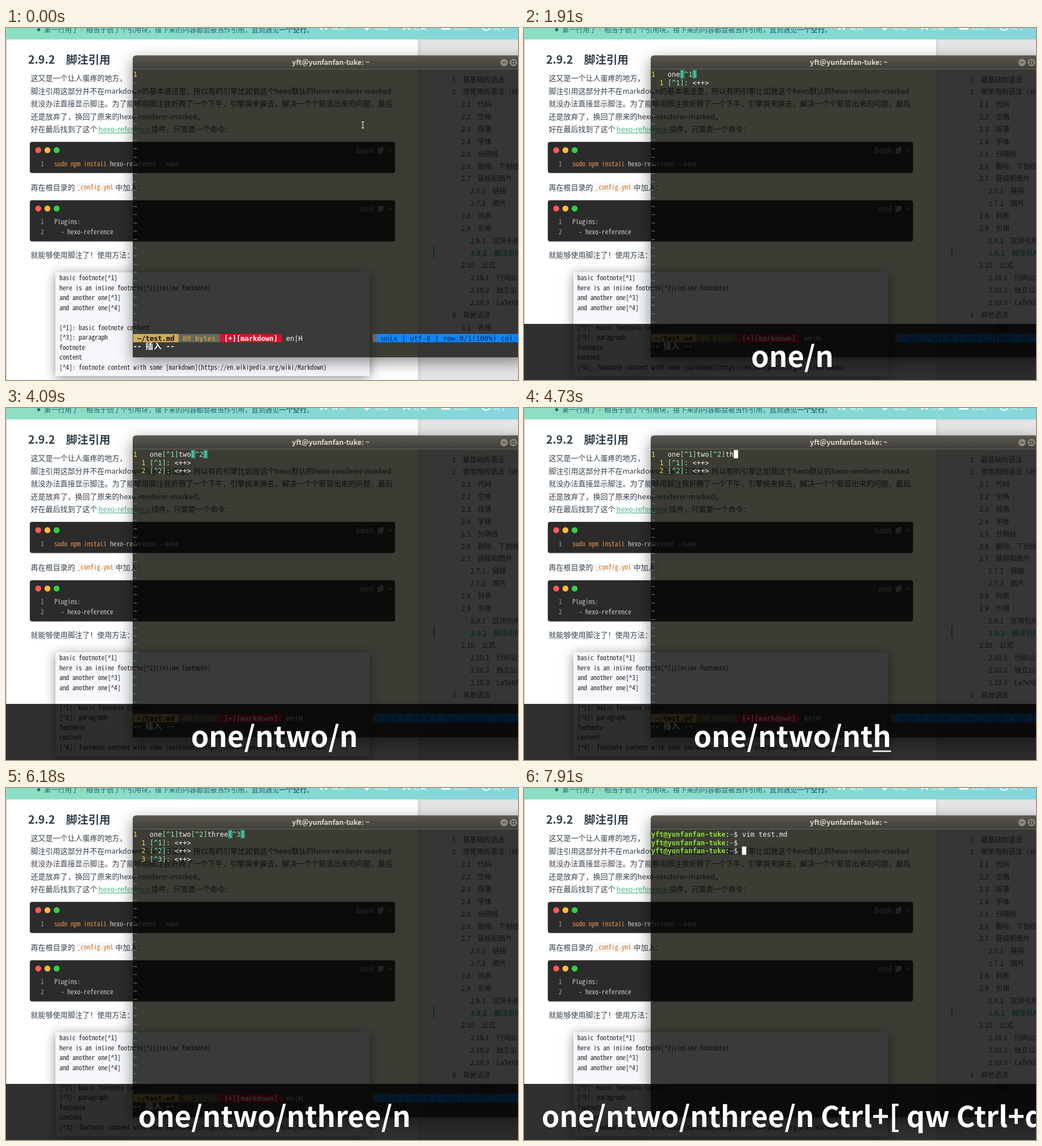
An HTML page with a canvas that plays this animation: 901x621 px, repeating every 8000 ms.

```html
<!DOCTYPE html>
<html lang="zh">
<head>
<meta charset="utf-8">
<style>
html, body { margin: 0; width: 100%; height: 100%; overflow: hidden; }
canvas { display: block; }
</style>
</head>
<body>
<canvas id="stage" width="901" height="621"></canvas>
<script>
const ctx = document.getElementById('stage').getContext('2d');
const W = 901, H = 621, LOOP = 8000;
const SANS = '"Noto Sans CJK SC", "Noto Sans", sans-serif';
const CODE = '"Noto Sans Mono CJK SC", "Noto Sans Mono", monospace';
const TERM = '"DejaVu Sans Mono", "Noto Sans Mono CJK SC", monospace';
const WIN = { x: 223, y: 48.5, w: 690, h: 532.5, bar: 24 };
const CELL = { x: 223.7, y: 74.2, w: 7.27, h: 14.55 };
const USER = 'yft@yunfanfan-tuke';

// ---------- drawing helpers ----------
function text(str, x, y, color, font, align = 'left') {
  ctx.font = font;
  ctx.fillStyle = color;
  ctx.textAlign = align;
  ctx.fillText(str, x, y);
  return x + ctx.measureText(str).width;
}
function rect(x, y, w, h, color, radius = 0) {
  ctx.fillStyle = color;
  ctx.beginPath();
  ctx.roundRect(x, y, w, h, radius);
  ctx.fill();
}
function circle(x, y, r, color) {
  ctx.fillStyle = color;
  ctx.beginPath();
  ctx.arc(x, y, r, 0, 7);
  ctx.fill();
}
function line(points, color, width) {
  ctx.strokeStyle = color;
  ctx.lineWidth = width;
  ctx.beginPath();
  points.forEach(([x, y]) => ctx.lineTo(x, y));
  ctx.stroke();
}
function polygon(points, color) {
  ctx.fillStyle = color;
  ctx.beginPath();
  points.forEach(([x, y]) => ctx.lineTo(x, y));
  ctx.fill();
}
function gradient(x0, y0, x1, y1, ...colors) {
  const g = ctx.createLinearGradient(x0, y0, x1, y1);
  colors.forEach((c, i) => g.addColorStop(i / (colors.length - 1), c));
  return g;
}
function shadowed(color, blur, dy, draw) {
  ctx.save();
  ctx.shadowColor = color;
  ctx.shadowBlur = blur;
  ctx.shadowOffsetY = dy;
  draw();
  ctx.restore();
}

// ---------- web page behind the terminal ----------
const CONTENTS = [
  '1 最基础的语法', '2 很常用的语法（对新手）', '2.1 代码', '2.2 空格', '2.3 段落', '2.4 字体',
  '2.5 分隔线', '2.6 删除、下划线', '2.7 链接和图片', '2.7.1 链接', '2.7.2 图片', '2.8 列表',
  '2.9 引用', '2.9.1 区块引用', '2.9.2 脚注引用', '2.10 公式', '2.10.1 行间公式',
  '2.10.2 独立公式', '2.10.3 LaTeX的公式', '3 其他语法', '3.1 表格'];
const FOOTNOTES = [
  'basic footnote[^1]', 'here is an inline footnote[^2](inline footnote)', 'and another one[^3]',
  'and another one[^4]', '', '[^1]: basic footnote content', '[^3]: paragraph', 'footnote', 'content',
  '[^4]: footnote content with some [markdown](https://en.wikipedia.org/wiki/Markdown)'];

function header() {
  rect(0, 0, W, 20, gradient(0, 0, W, 0, '#8cdfc2', '#86d9cf', '#88d6dd'));
  rect(0, 20, W, 3, gradient(0, 20, 0, 23, 'rgba(0,0,0,.05)', 'rgba(0,0,0,0)'));
  const font = `12.14px ${SANS}`, ink = '#2d6470', white = '#f4fffd';
  circle(57.5, 3, 2.8, ink);
  text('第一行用了', 67, 8, ink, font);
  text('>', 131, 7, '#b08a40', `10.5px ${CODE}`);
  let x = text('相当于创了个引用块，接下来的内容都会被当作引用，直到遇见', 141, 8, ink, font);
  x = text('一个空行', x, 8, ink, 'bold ' + font);
  text('。', x, 8, ink, font);

  ['首页', '标签', '分类', '归档', '关于'].forEach((label, i) =>
    text(label, [573, 649, 716, 787, 857][i], 3, white, font));
  rect(553, -4, 4, 7, white);
  rect(561, -4, 4, 7, white);
  polygon([[627, -3], [635, 5], [642, -2]], white);
  polygon([[699, -4], [699, 4], [705, 0], [711, 4], [711, -4]], white);
  rect(766, -6, 16, 9, white, 1);
  ctx.strokeStyle = white;
  ctx.lineWidth = 2;
  ctx.beginPath();
  ctx.arc(845, -3, 7, 0, 7);
  ctx.stroke();
}

function codeBlock(y, h, label) {
  shadowed('rgba(0,0,0,.2)', 3, 0, () => rect(42, y, 642.5, h, '#2c2b2b', 4));
  ['#fc5a56', '#fdbc40', '#34cf48'].forEach((c, i) => circle(56.7 + 16.2 * i, y + 14.5, 5.2, c));
  const grey = '#888';
  text(label, 647, y + 20, grey, `bold 13px ${SANS}`, 'right');
  rect(654, y + 11, 7, 10, grey, 1);
  rect(658, y + 9, 6, 9, '#999', 1);
  line([[672, y + 17], [675.5, y + 13.5], [679, y + 17]], grey, 1.5);
}

function page() {
  const font = `13px ${SANS}`, ink = '#34404c', code = `11.52px ${CODE}`;
  rect(0, 0, W, H, '#fff');
  rect(WIN.x, WIN.y, 725 - WIN.x, WIN.h, '#fffbe2');
  rect(725, 0, 176, H, '#e5e5e5');
  rect(725, 0, 8, H, gradient(725, 0, 733, 0, 'rgba(0,0,0,.06)', 'rgba(0,0,0,0)'));
  rect(0, 20, 1.5, H, '#d2d4d4');
  header();

  text('2.9.2\u3000脚注引用', 39, 62.5, '#2f3d49', `bold 19.5px ${SANS}`);
  ['这又是一个让人蛋疼的地方，',
   '脚注引用这部分并不在markdown的基本语法里，所以有的引擎比如我这个hexo默认的hexo-renderer-marked',
   '就没办法直接显示脚注。为了能够用脚注我折腾了一个下午，引擎换来换去，解决一个个新冒出来的问题，最后',
   '还是放弃了，换回了原来的hexo-renderer-marked。',
   '好在最后找到了这个'].forEach((s, i) => text(s, 43.5, 93.3 + 22.4 * i, ink, font));
  const linkEnd = text('hexo-reference', 162.5, 183, '#4fb98a', `500 13px ${SANS}`);
  rect(162.5, 184.5, linkEnd - 162.5, 1.2, '#4fb98a');
  text('插件，只需要一个命令：', 255.5, 183, ink, font);

  codeBlock(201, 54.7, 'bash');
  text('1', 61, 244, '#999', code);
  const x = text('sudo npm install', 85, 244, '#e8924f', code);
  text(' hexo-reference --save', x, 244, '#ccc', code);

  text('再在根目录的', 43.5, 285.5, ink, font);
  rect(122, 273, 70, 17, '#f8f8f8', 2);
  text('_config.yml', 125.5, 285, '#d0701c', code);
  text('中加入：', 192.5, 285.5, ink, font);

  codeBlock(304, 72.5, 'xml');
  ['Plugins:', '  - hexo-reference'].forEach((s, i) => {
    text(i + 1, 61, 346 + 18 * i, '#999', code);
    text(s, 85, 346 + 18 * i, '#ccc', code);
  });
  text('就能够使用脚注了！使用方法：', 43.5, 405, ink, font);

  shadowed('rgba(0,0,0,.45)', 18, 3, () => rect(87, 431, 553, 183, '#f5f7fa'));
  FOOTNOTES.forEach((s, i) => text(s, 94, 445 + 17.5 * i, '#1e1e1e', `11.33px ${CODE}`));

  CONTENTS.forEach((entry, i) => {
    const [number, title] = entry.split(' ');
    const active = number === '2.9.2';
    text(number + '\u3000' + title, 769 + 16 * number.split('.').length, 95.6 + 21.85 * i,
      active ? '#30b478' : '#444', `${active ? 'bold ' : ''}12.17px ${SANS}`);
  });
  rect(752, 385, 2, 20, '#30b478');
}

// ---------- terminal window ----------
function terminalWindow() {
  ctx.save();
  ctx.beginPath();
  ctx.rect(0, 0, W, H);
  ctx.roundRect(WIN.x, WIN.y, WIN.w, WIN.h, [6, 6, 0, 0]);
  ctx.clip('evenodd');
  shadowed('rgba(0,0,0,.45)', 26, 8, () => rect(WIN.x, WIN.y, WIN.w, WIN.h, '#000', [6, 6, 0, 0]));
  ctx.restore();

  rect(WIN.x, WIN.y + WIN.bar, WIN.w, WIN.h - WIN.bar, 'rgba(2,2,1,.77)');
  rect(WIN.x, WIN.y, WIN.w, WIN.bar,
    gradient(0, WIN.y, 0, WIN.y + WIN.bar, '#5a5850', '#403f3a'), [6, 6, 0, 0]);
  text(USER + ': ~', 571.5, 65, '#dfdbd2', `bold 12.3px ${SANS}`, 'center');
  circle(876.5, 61, 6.5, '#8c8980');
  circle(893, 61, 6.5, '#8c8980');
  line([[873.5, 61], [879.5, 61]], '#3c3b37', 1.4);
  ctx.strokeRect(890.5, 58.5, 5, 5);
}

// Writes on the character grid and returns the next free column.
function put(row, col, str, color, { bold = false, bg } = {}) {
  const y = CELL.y + CELL.h * row;
  for (const ch of String(str)) {
    const span = ch > '\u2e80' ? 2 : 1;
    const x = CELL.x + CELL.w * col;
    if (bg) rect(x, y, CELL.w * span + .3, CELL.h, bg);
    const font = span === 2 ? `13.5px ${SANS}` : `12.08px ${TERM}`;
    if (ch !== ' ') text(ch, x, y + 11.8, color, (bold ? 'bold ' : '') + font);
    col += span;
  }
  return col;
}
const cursor = (row, col) => put(row, col, ' ', '#fff', { bg: '#fff' });

function statusBar({ mode, buffer, notes }) {
  const row = 32, total = notes + 1;
  let col = put(row, 0, ' ~/test.md ', '#111', { bold: true, bg: '#d0ac5c' });
  col = put(row, col, ' 80 bytes ', '#e0b020', { bg: '#666' });
  col = put(row, col, ' [+][markdown] ', '#fff', { bold: true, bg: '#d4122a' });
  put(row, col, ' en|H', '#fff');
  const percent = Math.floor(100 / total);
  const column = buffer ? buffer.length + (mode === 'insert') : 0;
  const info = ` unix | utf-8 | row:${buffer ? 1 : 0}/${total}(${percent}%) col:${column} `;
  const start = 95 - info.length;
  const syntax = mode === 'syntax' || mode === 'written' ? ' markdownFootnote' : ' ';
  put(row, start - syntax.length, syntax, '#d8b428', { bg: '#666' });
  put(row, start, info, '#06203c', { bg: '#0f87ff' });
}

function editor(state, cursorOn) {
  const { mode, buffer, notes } = state;
  const yellow = '#e8dc50', green = '#87f0af';
  put(0, 0, 1, yellow);
  buffer.split(/(\[\^\d\])/).reduce(
    (col, part) => put(0, col, part, part[0] === '[' ? green : '#f0f0f0'), 4);
  for (let i = 1; i <= notes; i++) {
    put(i, 2, i, yellow);
    put(i, 4, `[^${i}]:`, green);
    put(i, 10, '<++>', '#f0f0f0');
  }
  for (let row = notes + 1; row < 32; row++) put(row, 0, '~', '#5484c0');

  const end = 4 + buffer.length;
  if (buffer.endsWith(']') && mode !== 'written') {
    put(0, end - 4, '[', green, { bg: '#2f9a88' });
    put(0, end - 1, ']', green, { bg: '#2f9a88' });
  }
  if (mode === 'insert') {
    if (cursorOn) cursor(0, end);
    put(33, 0, '-- 插入 --', '#fff', { bold: true });
  } else if (mode === 'written') {
    put(33, 0, '"test.md" 4L, 58C 已写入', '#f0f0f0');
  } else if (cursorOn) {
    put(0, end - 1, ']', '#20604a', { bg: '#8ff5b8' });
  }
  statusBar(state);
}

function shell(prompts, cursorOn) {
  let col;
  for (let row = 0; row < prompts; row++) {
    col = put(row, 0, USER, '#8ae234', { bold: true });
    col = put(row, col, ':', '#f0f0f0');
    col = put(row, col, '~', '#729fcf', { bold: true });
    col = put(row, col, row ? '$ ' : '$ vim test.md', '#f0f0f0');
  }
  if (cursorOn) cursor(prompts - 1, col);
}

// ---------- pressed keys shown along the bottom ----------
const KEYS = 'one/ntwo/nthree/n Ctrl+[ qw Ctrl+d';

function keyOverlay(count, underlined) {
  if (!count) return;
  rect(0, 522, W, 99, 'rgba(0,0,0,.81)');
  const center = 472.3, keys = KEYS.slice(0, count);
  text(keys, center, 597.5, '#fff', `bold 50.6px ${SANS}`, 'center');
  if (!underlined) return;
  const last = keys.match(/(Ctrl\+.|.)$/)[0];
  const right = center + ctx.measureText(keys).width / 2;
  const width = ctx.measureText(last).width;
  rect(right - width, 604.2, width, 2.6, '#fff');
}

// ---------- timeline: time, keys shown, underline, buffer, notes (or prompts), mode ----------
const A = 'one[^1]', B = A + 'two[^2]', C = B + 'three[^3]';
const STEPS = [
  [-600, 0, 0, '', 0],
  [450, 1, 1, 'o', 0], [640, 2, 1, 'o', 0], [730, 2, 1, 'on', 0], [820, 3, 1, 'one', 0],
  [1000, 4, 1, 'one', 0], [1090, 4, 1, 'one/', 0], [1180, 5, 1, 'one/', 0],
  [1360, 5, 0, 'one/', 0], [1450, 5, 0, A, 1],
  [2450, 6, 1, A + 't', 1], [2640, 6, 0, A + 't', 1], [2910, 7, 1, A + 't', 1],
  [3000, 7, 1, A + 'tw', 1], [3180, 8, 1, A + 'tw', 1], [3270, 8, 1, A + 'two', 1],
  [3360, 9, 1, A + 'two', 1], [3450, 10, 1, A + 'two/', 1], [3640, 10, 0, B, 2],
  [4640, 11, 1, B + 't', 2], [4730, 12, 1, B + 'th', 2], [4820, 13, 1, B + 'thr', 2],
  [5000, 14, 1, B + 'thre', 2], [5090, 15, 1, B + 'thre', 2], [5270, 15, 0, B + 'three', 2],
  [5360, 16, 1, B + 'three', 2], [5550, 17, 1, B + 'three/', 2], [5730, 17, 0, C, 3],
  [6360, 24, 1, C, 3], [6450, 24, 1, C, 3, 'normal'], [6640, 24, 0, C, 3, 'syntax'],
  [6730, 26, 1, C, 3, 'syntax'], [6820, 27, 1, C, 3, 'syntax'], [7000, 27, 0, C, 3, 'written'],
  [7360, 27, 0, '', 2, 'shell'], [7640, 34, 1, '', 2, 'shell'], [7910, 34, 0, '', 3, 'shell']];

function draw(time) {
  const [since, keys, underlined, buffer, notes, mode = 'insert'] =
    STEPS.findLast(step => step[0] <= time);
  const cursorOn = time - since < 450;
  page();
  terminalWindow();
  if (mode === 'shell') shell(notes, cursorOn);
  else editor({ mode, buffer, notes }, cursorOn);
  if (!keys) {
    line([[625.5, 165.5], [630.5, 165.5]], '#eee', 1);
    line([[628, 165.5], [628, 176.5]], '#eee', 1.2);
    line([[625.5, 176.5], [630.5, 176.5]], '#eee', 1);
  }
  keyOverlay(keys, underlined);
}

const start = performance.now();
function tick() {
  draw((performance.now() - start) % LOOP);
  requestAnimationFrame(tick);
}
tick();
</script>
</body>
</html>
```
